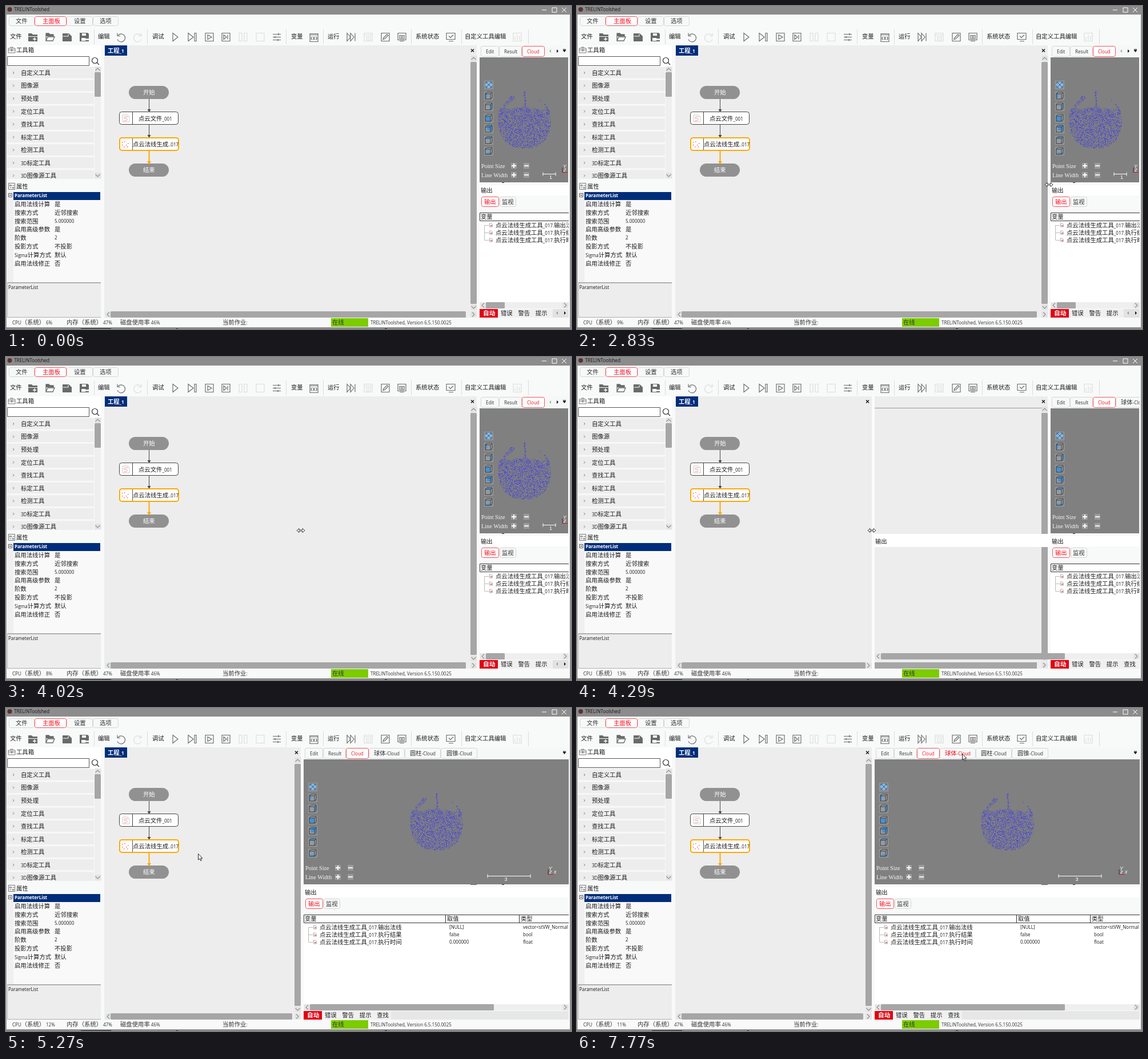
Write an HTML page with a canvas that moves like this. It is 989 by 566 pixels and loops after 8000 ms.

```html
<!DOCTYPE html>
<html lang="zh-CN">
<head>
<meta charset="utf-8">
<style>
html, body { margin: 0; width: 100%; height: 100%; overflow: hidden; background: #f8f9f9; }
canvas { display: block; }
</style>
</head>
<body>
<canvas id="stage" width="989" height="566"></canvas>
<script>
const g = document.getElementById('stage').getContext('2d');
const APP = 'TRELINToolshed', LOOP = 8000;
const SANS = '"Open Sans","Noto Sans CJK SC","Noto Sans CJK",sans-serif';
const CJK = '"Noto Sans CJK SC","Noto Sans CJK",sans-serif';
const GRAY = '#696969', PALE = '#dcdcdc', NAVY = '#002d7a', THUMB = '#a6a6a6';

// ---- drawing helpers
function box(x, y, w, h, c) { g.fillStyle = c; g.fillRect(x, y, w, h); }
function frame(x, y, w, h, c, r = 0, fill, lw = 1) {
  g.beginPath(); g.roundRect(x + lw / 2, y + lw / 2, w - lw, h - lw, r);
  if (fill) { g.fillStyle = fill; g.fill(); }
  if (c) { g.strokeStyle = c; g.lineWidth = lw; g.stroke(); }
}
function bar(x, y, w, h, r, c) {
  g.beginPath(); g.roundRect(x, y, w, h, r); g.fillStyle = c; g.fill();
}
function line(x, y, d, c, w = 1) {
  g.save(); g.translate(x, y); g.strokeStyle = c; g.lineWidth = w;
  g.stroke(new Path2D(d)); g.restore();
}
function shape(x, y, d, c) {
  g.save(); g.translate(x, y); g.fillStyle = c; g.fill(new Path2D(d)); g.restore();
}
// Chinese and Latin runs share a baseline, Latin is set smaller; y is the middle
function text(s, x, y, c = '#1c1c1c', size = 10.35, weight = 400) {
  const runs = s.match(/[\u3000-\uffef]+|[^\u3000-\uffef]+/g);
  const wide = /[\u3000-\uffef]/;
  y += size * (wide.test(s) ? .38 : .29);
  g.fillStyle = c;
  for (const r of runs) {
    g.font = wide.test(r) ? `${weight} ${size}px ${CJK}` : `${weight} ${size * .775}px ${SANS}`;
    g.fillText(r, x, y);
    x += g.measureText(r).width;
  }
}
function tab(s, x, y, w, h, tx, on, hot) {
  frame(x, y, w, h, on ? '#f0545c' : '#d6d6d6', 3, on ? '#fff' : '#f7f8f8');
  text(s, tx, y + h / 2, on || hot ? '#f01020' : '#333');
}
const CHEVRON = { u: 'M-4 2L0-2 4 2', d: 'M-4-2L0 2 4-2', l: 'M2-4L-2 0 2 4', r: 'M-2-4L2 0-2 4' };
function chevron(x, y, dir) { box(x - 5, y - 5, 11, 10, '#e4e4e4'); line(x, y, CHEVRON[dir], '#8f8f8f', 1.1); }
function vbar(x, y0, y1, t0, t1, c = THUMB) {
  box(x, y0, 11, y1 - y0, '#efefef');
  chevron(x + 5.5, y0 + 5, 'u'); chevron(x + 5.5, y1 - 6, 'd');
  bar(x, t0, 11, t1 - t0, 1.5, c);
}
function hbar(x0, x1, y, t0, t1) {
  box(x0, y, x1 - x0, 11, '#efefef');
  chevron(x0 + 6, y + 5.5, 'l'); chevron(x1 - 6, y + 5.5, 'r');
  bar(t0, y, t1 - t0, 11, 1.5, THUMB);
}

// ---- title, ribbon and status bar
const BOX = 'M-7-7h14v14h-14z';
const ICONS = [
  [201, 'M-5-3A7 7 0 1 1-6 4M-6-7v5h5', GRAY],
  [231, 'M5-3A7 7 0 1 0 6 4M6-7v5h-5', PALE],
  [296, 'M-4-7L5 0-4 7z', GRAY],
  [326, 'M-7-7L2 0-7 7zM4-7h3v14h-3z', GRAY],
  [356, BOX + 'M-3-4L4 0-3 4z', GRAY],
  [385, BOX + 'M-4-4L1 0-4 4zM3-4v8', GRAY],
  [415, 'M-7-7h5v14h-5zM2-7h5v14h-5z', PALE],
  [445, BOX, PALE],
  [474, 'M-7-5h14M-7 0h14M-7 5h14M3-7v4M-3-2v4M2 3v4', GRAY],
  [539, 'M-7-6h14v14h-14zM-7-4h14M-2-1l4 6M2-1l-4 6M-4-1q-2 3 0 6M4-1q2 3 0 6', GRAY],
  [604, 'M-7-7L-1 0-7 7zM-1-7L5 0-1 7zM7-7v14', GRAY],
  [634, BOX + 'M-7-4h14M-3-1h7v6h-7zM-1 2h3', PALE],
  [664, BOX + 'M-4 4l1-3 6-6 2 2-6 6z', GRAY],
  [693, 'M-7-7h14v12h-14zM-4-3h8v6h-8zM-1.5 0a1.5 1.5 0 1 0 3 0a1.5 1.5 0 1 0-3 0M-4 7h8', GRAY],
  [779, 'M-8-7h15v11h-15zM-4 7h8M-4-2l3 3 5-5', GRAY],
  [895, BOX + 'M-4 5v-5M0 5v-9M4 5v-7', PALE]
];
function ribbon() {
  box(0, 0, 989, 566, '#f8f9f9');
  box(0, 0, 989, 15, '#8c8c8c');
  g.beginPath(); g.arc(6.5, 6, 4, 0, 7); g.fillStyle = '#5a3234'; g.fill();
  text(APP, 14, 6, '#161616', 10.7);
  line(942, 7, 'M-4 0h8', '#fff');
  line(960, 7, 'M-4-4h8v8h-8z', '#fff');
  line(977, 7, 'M-4-4l8 8M4-4l-8 8', '#fff');
  ['文件', '主面板', '设置', '选项'].forEach((s, i) => {
    const x = [5, 50, 106, 152][i];
    tab(s, x, 18, [45, 56, 46, 45][i], 17, [17, 64, 119, 164][i], i == 1);
  });
  [['文件', 7], ['编辑', 161], ['调试', 256], ['变量', 499], ['运行', 563], ['系统状态', 717], ['自定义工具编辑', 803]]
    .forEach(([s, x]) => text(s, x, 53));
  for (const x of [154, 247, 490, 555, 709, 797, 914]) box(x, 41, 1, 26, '#dcdcdc');
  shape(47, 54, 'M-8-6h6l2 2h8v3h-16zM-8 0h16v8h-16z', GRAY);
  line(50, 58, 'M-3 0h6M0-3v6', '#fff', 1.4);
  line(77, 54, 'M-7 7v-13h5l2 2h6v4M-7 7l3-7h12l-3 7z', GRAY, 1.3);
  shape(77, 54, 'M-7-6h5l2 2h6v3h-13z', GRAY);
  shape(107, 54, 'M-8-6h11l5 5v9h-16z', GRAY);
  line(107, 54, 'M-7-1h9M2-5v4', '#fff');
  shape(137, 54, 'M-8-7h14l2 2v13h-16z', GRAY);
  box(133, 48, 7, 4, '#fff'); box(132, 56, 7, 5, '#fff'); box(139, 57, 6, 3, '#eee');
  for (const [x, d, c] of ICONS) line(x, 54.5, d, c, 1.15);
}
function status(cpu) {
  box(0, 546, 989, 17, '#f8f9f9');
  text('CPU（系统）', 11, 554, '#333'); text(cpu + '%', 70, 555, '#333');
  text('内存（系统）', 106, 554, '#333'); text('47%', 170, 555, '#333');
  text('磁盘使用率 46%', 200, 554, '#333');
  text('当前作业:', 379, 554, '#333');
  box(569, 547, 65, 15, '#7ccc00'); text('在线', 571, 554, '#333');
  text(APP + ', Version 6.5.150.0025', 638, 555, '#333');
  box(0, 15, 1, 551, '#999'); box(987, 15, 2, 551, '#8c8c8c');
  box(0, 563, 989, 3, '#8c8c8c');
  box(131, 565, 53, 1, '#222'); box(298, 565, 3, 1, '#222'); box(663, 565, 4, 1, '#222');
}

// ---- left column
const TOOLS = ['自定义工具', '图像源', '预处理', '定位工具', '查找工具', '标定工具', '检测工具', '3D标定工具', '3D图像源工具'];
const PROPS = [['启用法线计算', '是'], ['搜索方式', '近邻搜索'], ['搜索范围', '5.000000'], ['启用高级参数', '是'],
  ['阶数', '2'], ['投影方式', '不投影'], ['Sigma计算方式', '默认'], ['启用法线修正', '否']];
function sidebar() {
  box(2, 69, 164, 37, '#fff');
  line(10, 77, 'M-6-3h12v8h-12zM-6 0h12M-2-3v-2h4v2M-1-1h2v3h-2z', '#777');
  text('工具箱', 18, 77);
  frame(2, 88, 144, 17, '#555', 0, '#fff');
  line(155.5, 95.5, 'M-5 0a5 5 0 1 0 10 0a5 5 0 1 0-10 0M3.5 3.5l4 4', '#333', 1.2);
  g.save(); g.beginPath(); g.rect(2, 106, 153, 197); g.clip();
  TOOLS.forEach((s, i) => {
    const y = 117 + 22.55 * i;
    box(2, y - 11, 153, 22.5, '#f8f8f8'); box(2, y - 10, 152, 19.5, '#eeeded');
    line(13, y, 'M-1-2L1 0-1 2', '#777');
    text(s, 26, y);
  });
  g.restore();
  vbar(155, 106, 303, 116, 159);
  line(9.5, 315.5, 'M-5-5h11v11h-11zM-3-2h3v2h-3zM2-1h3M-3 3h3M2 2h2v2h-2z', '#777');
  text('属性', 18, 316);
  box(2, 325, 164, 160, '#f9f9f9'); box(2, 325, 11, 160, '#f0f0f0');
  box(13, 326, 152, 14, NAVY);
  frame(4, 328, 7, 7, '#555', 0, '#fff'); box(6, 331, 3, 1, '#000');
  text('ParameterList', 15, 332, '#fff', 10.35, 700);
  PROPS.forEach(([k, v], i) => {
    const y = 347 + 14.85 * i;
    text(k, 15, y); text(v, 85, y);
  });
  box(2, 484, 164, 62, '#b0b0b0'); box(3, 486, 163, 59, '#ededed');
  text('ParameterList', 4, 493);
}

// ---- flow chart, r is its right edge
function cross(x) { line(x, 78, 'M-2.5-2.5l5 5M2.5-2.5l-5 5', '#111', 1.3); }
function pill(s, y) { bar(215, y, 70, 23, 11.5, '#919191'); text(s, 240, y + 11.5, '#fff'); }
function flow(r, bare, hover) {
  box(172, 69, r - 172, 477, '#ededed');
  box(173, 69, 39, 18, NAVY); text('工程_1', 178, 78, '#fff', 10.35, 700);
  cross(r - 7.5);
  pill('开始', 140); pill('结束', 276);
  for (const y of [163, 208]) {
    box(250, y, 1, 22, '#444');
    shape(250.5, y + 23, 'M-3-5h6L0 0z', '#444');
  }
  frame(198, 185, 104, 23, '#444', 4, '#fff'); box(221, 186, 1, 21, '#444');
  line(210, 197, 'M-6-6h9l3 3v9h-12z', '#ccc');
  line(210, 197, 'M4-3h-6q-3 3 0 3h3q3 3-1 4h-4', '#e9a0a0', 1);
  text('点云文件_001', 232, 197);
  frame(198, 230, 105, 24, '#ffa800', 4, '#fff', 2); box(221, 232, 1, 20, '#555');
  for (const [x, y] of [[203, 243], [207, 237], [206, 246], [210, 243], [213, 240], [212, 246], [203, 238]]) box(x, y, 1.5, 1.5, '#e86a6a');
  text('点云法线生成..017', 222, 242);
  box(249.5, 254, 2, 20, '#ffa800'); shape(250.5, 277, 'M-3.5-5h7L0 0z', '#ffa800');
  if (bare) { hbar(173, r, 535, 183, r - 11); return; }
  vbar(r - 11, 87, 534, 98, 522, hover ? '#7a7a7a' : THUMB);
  hbar(173, r, 535, 183, r < 600 ? 501 : 805);
}

// ---- point cloud in the shape of an apple, centred on x = 0
let seed = 7;
const rnd = () => (seed = seed * 16807 % 2147483647) / 2147483647;
const cloud = [];
function sprinkle(n, place) { for (let i = 0; i < n; i++) cloud.push(place()); }
sprinkle(2350, () => {
  let x, y;
  do {
    x = rnd() * 2 - 1; y = rnd() * 2 - 1;
  } while (Math.abs(x) ** 2.3 + Math.abs(y) ** 2.3 > 1 || y < -.5 + .1 * rnd() - .06 * Math.cos(x * 5));
  return [x * 46, 200 + y * 49];
});
sprinkle(70, () => {
  const a = Math.PI * (1.08 + .25 * rnd()), k = 1 - .14 * rnd();
  return [46 * k * Math.cos(a), 200 + 47 * k * Math.sin(a)];
});
sprinkle(25, () => [-26 + 9 * rnd(), 158 + 5 * rnd()]);
sprinkle(22, () => {
  const a = -Math.PI * (.1 + .19 * rnd() ** 1.5), k = 1 - .06 * rnd();
  return [46 * k * Math.cos(a), 200 + 47 * k * Math.sin(a)];
});
sprinkle(45, () => { const v = rnd(); return [-1.5 + 3 * rnd() + v * 2, 149 + v * 25]; });

// ---- right column, x is its left edge
function cube(x, y, i) {
  frame(x - 8, y - 7, 16, 15, '#a0a0a0', 0, '#808080');
  if (!i) {
    box(x - 6, y - 5, 12, 11, '#8ab8e0');
    line(x, y, 'M-5-5l10 10M5-5l-10 10M-5-2v-3h3M5-2v-3h-3M-5 2v3h3M5 2v3h-3', '#2b5788', .9);
    return;
  }
  const face = ['M-6-3l3-3v9l-3 3z', 'M3-3l3-3v9l-3 3z', 'M-6-3h9v9h-9z', 'M-3-6h9v9h-9z', 'M-6-3l3-3h9l-3 3z', 'M-6 6l3-3h9l-3 3z'][i - 1];
  shape(x, y, 'M-6-3l3-3h9v9l-3 3h-9z', '#959a9f');
  shape(x, y, face, '#4a90d0');
  line(x, y, 'M-6-3h9v9h-9zM-6-3l3-3h9v9l-3 3M3-3l3-3', '#2a3036', .8);
}
function axes(x) {
  g.font = 'italic 9px "Liberation Sans",sans-serif'; g.fillStyle = '#fff';
  g.fillText('Y', x - 3, 284); g.fillText('z', x - 2, 290); g.fillText('x', x + 6, 290);
  line(x, 291.5, 'M-5 0h10', '#d02020'); line(x - 4, 291, 'M0 0v-8', '#333');
}
function view(x, wide, stale) {
  box(x, 90, (wide ? 985 : 984) - x, 219, '#808080');
  [138, 157, 176, 196, 215, 235, 254].forEach((y, i) => cube(x + 16, y, i));
  g.font = '10.2px "Liberation Serif",serif';
  ['Point Size', 'Line Width'].forEach((s, i) => {
    const y = 280 + 16 * i;
    g.fillStyle = '#f4f4f4'; g.fillText(s, x + 3, y + 3.5);
    for (const b of [60, 82]) {
      box(x + b - 5, y - 5, 10, 10, '#9c9c9c');
      line(x + b, y, b == 60 ? 'M-4 0h8M0-4v8' : 'M-4 0h8', '#fff', 1.8);
    }
  });
  if (stale) return;
  const mid = (x + 985) / 2;
  g.fillStyle = '#4f4dca';
  for (const [px, py] of cloud) g.fillRect(Math.round(mid + px), Math.round(py), 1, 1);
  const [a, b] = wide ? [843, 918] : [940, 962];
  line(a, 294.5, `M0-3v6M0 0h${b - a}M${b - a}-3v6`, '#fff');
  g.font = '9px "Liberation Sans",sans-serif'; g.fillStyle = '#fff';
  g.fillText(wide ? '3' : '1', (a + b) / 2 - 8 * wide, 303);
  axes(wide ? 953 : 978);
}
const ROWS = [['输出法线', '[NULL]', 'vector<stVW_Normal'], ['执行结果', 'false', 'bool'], ['执行时间', '0.000000', 'float']];
function panel(x, wide, stale, cur) {
  g.save(); g.beginPath(); g.rect(x, 69, 985 - x, 477); g.clip();
  box(x, 69, 985 - x, 21, '#f6f7f7');
  const tabs = [['Edit', 2, 32, 11], ['Result', 34, 40, 43], ['Cloud', 74, 40, 83], ['球体-Cloud', 114, 63, 123], ['圆柱-Cloud', 177, 63, 186], ['圆锥-Cloud', 240, 64, 250]];
  tabs.slice(0, wide ? 6 : stale ? 4 : 3).forEach(([s, l, w, tx], i) => {
    const hot = wide && cur.y < 89 && cur.x >= x + l && cur.x < x + l + w;
    tab(s, x + l, 70, w, 19, x + tx, i == 2, hot);
  });
  if (!stale) {
    shape(977.5, 79, 'M-3-2h6L0 2z', '#111'); box(975, 75.5, 5, 1, '#111');
    if (!wide) { shape(952, 79, 'M2-3v6l-3-3z', '#aaa'); shape(965, 79, 'M-1-3v6l3-3z', '#111'); }
  }
  view(x, wide, stale);
  box(868, 309, 4, 1, '#333'); if (wide) box(813, 309, 11, 1, '#666');
  box(x, 314, 985 - x, 18, '#fff');
  text('输出', x + 2, 323);
  tab('输出', x + 3, 334, 31, 18, x + 8, true);
  tab('监视', x + 35, 334, 29, 18, x + 39);
  box(x, 362, 985 - x, 157, '#fff');
  frame(x, 362, 990 - x, 15, '#333', 0, '#fff');
  text('变量', x + 2, 369.5);
  if (wide) {
    box(769, 362, 1, 15, '#333'); box(898, 362, 1, 15, '#333');
    text('取值', 772, 369.5); text('类型', 901, 369.5);
  }
  line(x + 8.5, 377, 'M0 7v26', '#bbb');
  ROWS.forEach(([s, v, type], i) => {
    const y = 384 + 13 * i;
    line(x + 8.5, y + .5, 'M0 0h8', '#bbb');
    line(x + 20, y, 'M-2.5-3h3l2 2v4h-5z', '#999', .8); shape(x + 20, y, 'M-.5-.5l2.5 1.5-2.5 1.5z', '#e02020');
    text('点云法线生成工具_017.' + s, x + 28, y);
    if (wide) { text(v, 776, y); text(type, 905, y); }
  });
  hbar(x, 985, 519, wide ? 532 : 840, wide ? 854 : 873);
  box(x, 531, 985 - x, 15, '#f0f0f0');
  box(x, 531, 32, 15, '#e00012'); text('自动', x + 6, 538, '#fff', 10.7, 700);
  ['错误', '警告', '提示', '查找'].slice(0, wide || stale ? 4 : 3).forEach((s, i) => text(s, x + 37 + 30.4 * i, 538));
  if (wide) box(674, 531, 311, 15, '#e7e7e7');
  else if (!stale) {
    box(957, 531, 28, 15, '#e2e2e2');
    shape(965, 538, 'M1-3v6l-3-3z', '#999'); shape(978, 538, 'M-1-3v6l3-3z', '#111');
  }
  g.restore();
}
// half-repainted area between the two layouts
function repaint() {
  box(517, 69, 4, 477, '#fbfbfb');
  box(521, 69, 308, 477, '#ededed');
  box(521, 89, 308, 1, '#999');
  cross(816.5);
  box(813, 90, 11, 444, '#efefef');
  chevron(818.5, 92, 'u'); chevron(818.5, 528, 'd');
  box(813, 98, 11, 424, THUMB);
  box(824, 69, 5, 477, '#f8f9f9');
  box(521, 310, 308, 23, '#fff'); text('输出', 522, 323);
  hbar(521, 985, 519, 532, 854);
  box(521, 535, 284, 11, THUMB); chevron(818, 540, 'r');
}

// ---- pointer path: time, x, y
const PATH = [[590, 958, 262], [1160, 819, 327], [1700, 819, 327], [1750, 824, 325], [2020, 826, 313], [3230, 826, 313],
  [3490, 647, 309], [3820, 516, 304], [4680, 516, 304], [5480, 273, 238], [5550, 273, 238], [6200, 270, 198], [6240, 270, 198],
  [6310, 265, 196], [6380, 259, 196], [6470, 259, 196], [6670, 259, 238], [6880, 259, 238], [7350, 759, 100], [7700, 674, 80]];
function pointer(t) {
  let i = PATH.findIndex(k => k[0] > t);
  if (i < 0) i = PATH.length;
  const a = PATH[Math.max(0, i - 1)], b = PATH[i] || a;
  const k = b[0] > a[0] ? (t - a[0]) / (b[0] - a[0]) : 0;
  return { x: Math.round(a[1] + (b[1] - a[1]) * k), y: Math.round(a[2] + (b[2] - a[2]) * k) };
}
function drawPointer(t, { x, y }) {
  if (t < 590) return;
  if (t >= 2000 && t < 4710) {
    if (t >= 2900 && t < 4020) { g.beginPath(); g.arc(x, y, 8, 0, 7); g.fillStyle = '#f5e52c'; g.fill(); }
    const d = 'M-7 0l4-3.5v2.5h6v-2.5L7 0 3 3.5v-2.5h-6v2.5z';
    shape(x, y, d, '#fff'); line(x, y, d, '#222', .9);
  } else {
    const d = 'M.5.5v10.5l2.4-2.2 1.8 3.9 1.7-.8-1.7-3.7h3.2z';
    shape(x, y, d, '#fff'); line(x, y, d, '#111', .9);
  }
}

const CPU = [[0, 6], [900, 11], [1950, 9], [2960, 8], [4080, 13], [5100, 12], [6100, 10], [7130, 11]];
function draw(t) {
  const cur = pointer(t), wide = t >= 4360, stale = t >= 4290 && !wide;
  ribbon();
  sidebar();
  flow(wide || stale ? 516 : 824, stale, t >= 1120 && t < 1980);
  panel(wide ? 521 : 829, wide, stale, cur);
  if (stale) repaint();
  status(CPU.filter(c => c[0] <= t).pop()[1]);
  drawPointer(t, cur);
}
const start = performance.now();
function tick(now) {
  draw(Math.max(0, now - start) % LOOP);
  requestAnimationFrame(tick);
}
draw(0);
requestAnimationFrame(tick);
</script>
</body>
</html>
```
